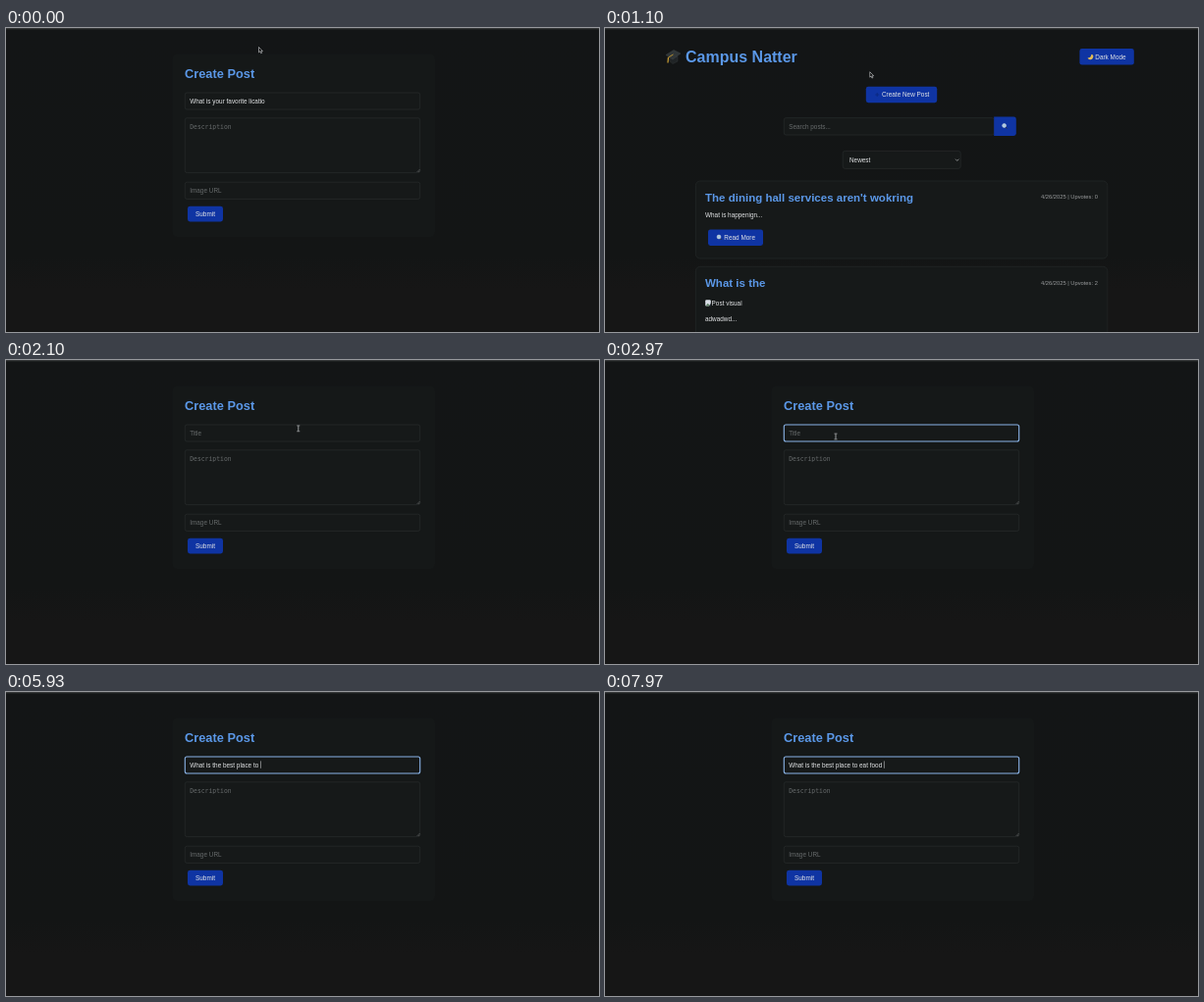
An HTML page with a canvas that plays this animation: 604x310 px, repeating every 8000 ms.

```html
<!DOCTYPE html>
<html lang="en">
<head>
<meta charset="utf-8">
<title>Create Post</title>
<style>
html, body { margin: 0; width: 100%; height: 100%; overflow: hidden; background: #141616; }
canvas { display: block; width: 604px; height: 310px; }
</style>
</head>
<body>
<canvas id="stage"></canvas>
<script>
const W = 604, H = 310, LOOP = 8000;
const canvas = document.getElementById('stage');
const ctx = canvas.getContext('2d');
const dpr = window.devicePixelRatio || 1;
canvas.width = W * dpr;
canvas.height = H * dpr;

const SANS = '"Liberation Sans", Arial, sans-serif';
const MONO = '"DejaVu Sans Mono", monospace';
const BLUE = '#5b98e8', BUTTON = '#0f34a3', LIGHT = '#e2e4e6';
const HINT = '#666a6b', LINE = '#292d2d', PANEL = '#161919';

const HOME_AT = 400, POSTS_AT = 1000, FORM_AT = 1830, FOCUS_AT = 2600, TYPE_AT = 3530;
const OLD_TITLE = 'What is your favorite licatio';
const NEW_TITLE = 'What is the best place to eat food ';

// [time, characters typed]
const TYPING = [
  [3530, 1], [4330, 8], [4370, 9], [4600, 14], [4770, 15], [4930, 17], [5130, 18],
  [5930, 26], [6600, 27], [7130, 30], [7400, 31], [7530, 32], [7670, 33], [7950, 35]
];

// [time, x, y] of the pointer, one list per visit
const LEAVE = [[0, 257.5, 19.5], [60, 255, 17], [300, 170, -12]];
const VISIT = [
  [730, 190, -10], [870, 232, 24], [1350, 312, 68], [1950, 312, 68],
  [2500, 235, 78], [3530, 235, 78]
];

function along(keys, t, i) {
  if (t <= keys[0][0]) return keys[0][i];
  for (let k = 1; k < keys.length; k++) {
    const a = keys[k - 1], b = keys[k];
    if (t < b[0]) {
      let u = (t - a[0]) / (b[0] - a[0]);
      if (keys !== TYPING) u = u * u * (3 - 2 * u);
      return a[i] + (b[i] - a[i]) * u;
    }
  }
  return keys[keys.length - 1][i];
}

// Large font drawn at a tenth of its size keeps fractional glyph widths.
function text(str, x, mid, size, color, weight = 'normal', family = SANS) {
  ctx.save();
  ctx.translate(x, mid + size * 0.36);
  ctx.scale(0.1, 0.1);
  ctx.font = `${weight} ${size * 10}px ${family}`;
  ctx.fillStyle = color;
  ctx.fillText(str, 0, 0);
  const width = ctx.measureText(str).width / 10;
  ctx.restore();
  return width;
}

function box(x, y, w, h, r, fill, stroke, lw = 0.7) {
  ctx.beginPath();
  ctx.roundRect(x, y, w, h, r);
  if (fill) { ctx.fillStyle = fill; ctx.fill(); }
  if (stroke) { ctx.strokeStyle = stroke; ctx.lineWidth = lw; ctx.stroke(); }
}

function shape(points, fill, stroke, lw = 0.7) {
  ctx.beginPath();
  points.forEach(([x, y], i) => i ? ctx.lineTo(x, y) : ctx.moveTo(x, y));
  ctx.closePath();
  if (fill) { ctx.fillStyle = fill; ctx.fill(); }
  if (stroke) { ctx.strokeStyle = stroke; ctx.lineWidth = lw; ctx.stroke(); }
}

function line(x1, y1, x2, y2, color, lw) {
  ctx.beginPath();
  ctx.moveTo(x1, y1);
  ctx.lineTo(x2, y2);
  ctx.strokeStyle = color;
  ctx.lineWidth = lw;
  ctx.stroke();
}

function disc(x, y, r, fill, stroke) {
  ctx.beginPath();
  ctx.arc(x, y, r, 0, Math.PI * 2);
  ctx.fillStyle = fill;
  ctx.fill();
  if (stroke) { ctx.strokeStyle = stroke; ctx.lineWidth = 0.6; ctx.stroke(); }
}

function button(x, y, w, h, label, tx) {
  box(x, y, w, h, 2.4, BUTTON);
  if (label) text(label, tx, y + h / 2, 6.4, LIGHT);
}

function lens(x, y) {
  line(x + 1, y + 1, x + 3, y + 3, '#30363c', 1);
  disc(x, y, 1.9, '#a9c8de', '#d8dde2');
}

function cap() {
  shape([[65, 29], [74, 29], [74, 34], [69, 36.5], [65, 33]], '#202426', '#383d40', 0.4);
  shape([[62, 27.5], [70, 22.5], [77, 26], [69, 32]], '#303638', '#474d50', 0.4);
  line(69.5, 27, 64.5, 30, '#c49a32', 0.9);
  line(64.5, 30, 64, 35.5, '#c49a32', 1.3);
}

function moon() {
  ctx.beginPath();
  ctx.arc(494.3, 29.2, 3, -1.2, 2.7);
  ctx.quadraticCurveTo(495.3, 30.2, 495.4, 26.4);
  ctx.fillStyle = '#e5bd55';
  ctx.fill();
}

function backdrop() {
  const g = ctx.createLinearGradient(0, 0, 0, H);
  g.addColorStop(0, '#131516');
  g.addColorStop(0.75, '#131515');
  g.addColorStop(0.86, '#161616');
  g.addColorStop(1, '#161616');
  ctx.fillStyle = g;
  ctx.fillRect(0, 0, W, H);
  ctx.fillStyle = '#343637';
  ctx.fillRect(0, 0, W, 1.3);
}

function card(y, h, title, votes) {
  box(92.4, y, 419.4, h, 4.5, PANEL, '#252929');
  text(title, 102, y + 16.7, 11.52, BLUE, 'bold');
  text('4/26/2025 | Upvotes: ' + votes, 444, y + 16.4, 5.76, '#9a9c9d');
}

function home(t) {
  cap();
  text('Campus Natter', 82, 29.2, 16, BLUE, 'bold');
  button(483.4, 21, 55.4, 16.6, 'Dark Mode', 499.3);
  moon();
  button(265.8, 59.8, 72.4, 16.4, 'Create New Post', 282);
  line(275.2, 68, 279.2, 68, '#0c2a80', 0.9);
  line(277.2, 66, 277.2, 70, '#0c2a80', 0.9);

  box(182.3, 91.7, 214, 17.3, 2, PANEL, LINE);
  text('Search posts...', 187.2, 100.3, 6.4, HINT);
  ctx.beginPath();
  ctx.roundRect(396.2, 90.6, 22.6, 19.4, [0, 2.4, 2.4, 0]);
  ctx.fillStyle = BUTTON;
  ctx.fill();
  lens(406.6, 99.5);

  box(242.2, 125.4, 120, 18, 2.4, PANEL, LINE);
  text('Newest', 249, 134.4, 6.4, LIGHT);
  ctx.beginPath();
  ctx.moveTo(357, 133.7);
  ctx.lineTo(358.7, 135.4);
  ctx.lineTo(360.4, 133.7);
  ctx.strokeStyle = '#b9bcbe';
  ctx.lineWidth = 0.7;
  ctx.stroke();

  if (t < POSTS_AT) return;
  card(156, 79, "The dining hall services aren't wokring", 0);
  text('What is happenign...', 102, 190.8, 6.4, LIGHT);
  button(105, 205.4, 56, 16.6, 'Read More', 121.3);
  lens(116, 213);

  card(243.3, 80, 'What is the', 2);
  box(102.2, 277.2, 5.6, 6.4, 1, '#d9dfe6');
  shape([[102.6, 283.4], [104.6, 280.8], [107.4, 283.4]], '#5c7f65');
  shape([[105.8, 284], [108, 280.4], [108, 284]], '#20262b');
  text('Post visual', 108.6, 280.8, 6.4, LIGHT);
  text('adwadwd...', 102, 296.2, 6.4, LIGHT);
}

function field(y, h, hint, focused, family) {
  box(182.3, y, 239.4, h, 2, PANEL, focused ? '#8ab4e8' : LINE, focused ? 1.1 : 0.7);
  if (hint) text(hint, 187.2, y + Math.min(h / 2, 8.7), 6.4, HINT, 'normal', family);
}

function form(title, focused, caret) {
  box(169.5, 26.5, 267.5, 186.5, 5, '#151818');
  text('Create Post', 182, 46, 12.8, BLUE, 'bold');

  field(66, 17, title ? '' : 'Title', focused);
  const end = 187.2 + (title ? text(title, 187.2, 74.2, 6.4, LIGHT) : 0);
  if (caret) line(end + 0.4, 70.4, end + 0.4, 77.8, '#c8cacc', 0.6);

  field(91.8, 55.8, 'Description', false, MONO);
  line(418.6, 147, 421.6, 144, '#7c7f80', 0.5);
  line(420.2, 147, 421.6, 145.6, '#7c7f80', 0.5);
  field(157.2, 17.2, 'Image URL', false);
  button(185, 181.8, 36, 15.6, 'Submit', 193);
}

function arrow(x, y) {
  shape([[x, y], [x, y + 5.4], [x + 1.3, y + 4.3], [x + 2.2, y + 6.3],
    [x + 3.1, y + 5.9], [x + 2.2, y + 4], [x + 3.9, y + 4]], '#0a0a0a', '#d4d6d8', 0.6);
}

function hand(x, y) {
  shape([[x - 1.2, y - 3], [x - 0.2, y - 3], [x, y - 0.8], [x + 2.8, y - 0.3],
    [x + 3, y + 1.3], [x + 2.2, y + 3], [x - 1, y + 3], [x - 3, y + 0.4],
    [x - 2.4, y - 0.1], [x - 1.2, y + 0.8]], '#eceeef', '#111', 0.4);
}

function beam(x, y) {
  line(x, y - 2.6, x, y + 2.6, '#d4d6d8', 0.7);
  line(x - 1.5, y - 2.9, x + 1.5, y - 2.9, '#d4d6d8', 0.6);
  line(x - 1.5, y + 2.9, x + 1.5, y + 2.9, '#d4d6d8', 0.6);
}

function pointer(t) {
  const keys = t < 700 ? LEAVE : VISIT;
  if (t >= TYPE_AT) return;
  const x = along(keys, t, 1), y = along(keys, t, 2);
  const onButton = t > HOME_AT && t < FORM_AT && x > 266 && x < 338 && y > 60 && y < 76;
  const onField = t >= FORM_AT && y > 66 && y < 83;
  (onButton ? hand : onField ? beam : arrow)(x, y);
}

function draw(t) {
  ctx.setTransform(dpr, 0, 0, dpr, 0, 0);
  backdrop();
  if (t < HOME_AT) {
    form(OLD_TITLE, false, false);
  } else if (t < FORM_AT) {
    home(t);
  } else {
    const n = t < TYPE_AT ? 0 : Math.floor(along(TYPING, t + 5, 1));
    const caret = (t >= FOCUS_AT && t < 2870) || t >= 3370;
    form(NEW_TITLE.slice(0, n), t >= FOCUS_AT, caret);
  }
  pointer(t);
}

const start = performance.now();
function tick() {
  draw((performance.now() - start) % LOOP);
  requestAnimationFrame(tick);
}
tick();
</script>
</body>
</html>
```
